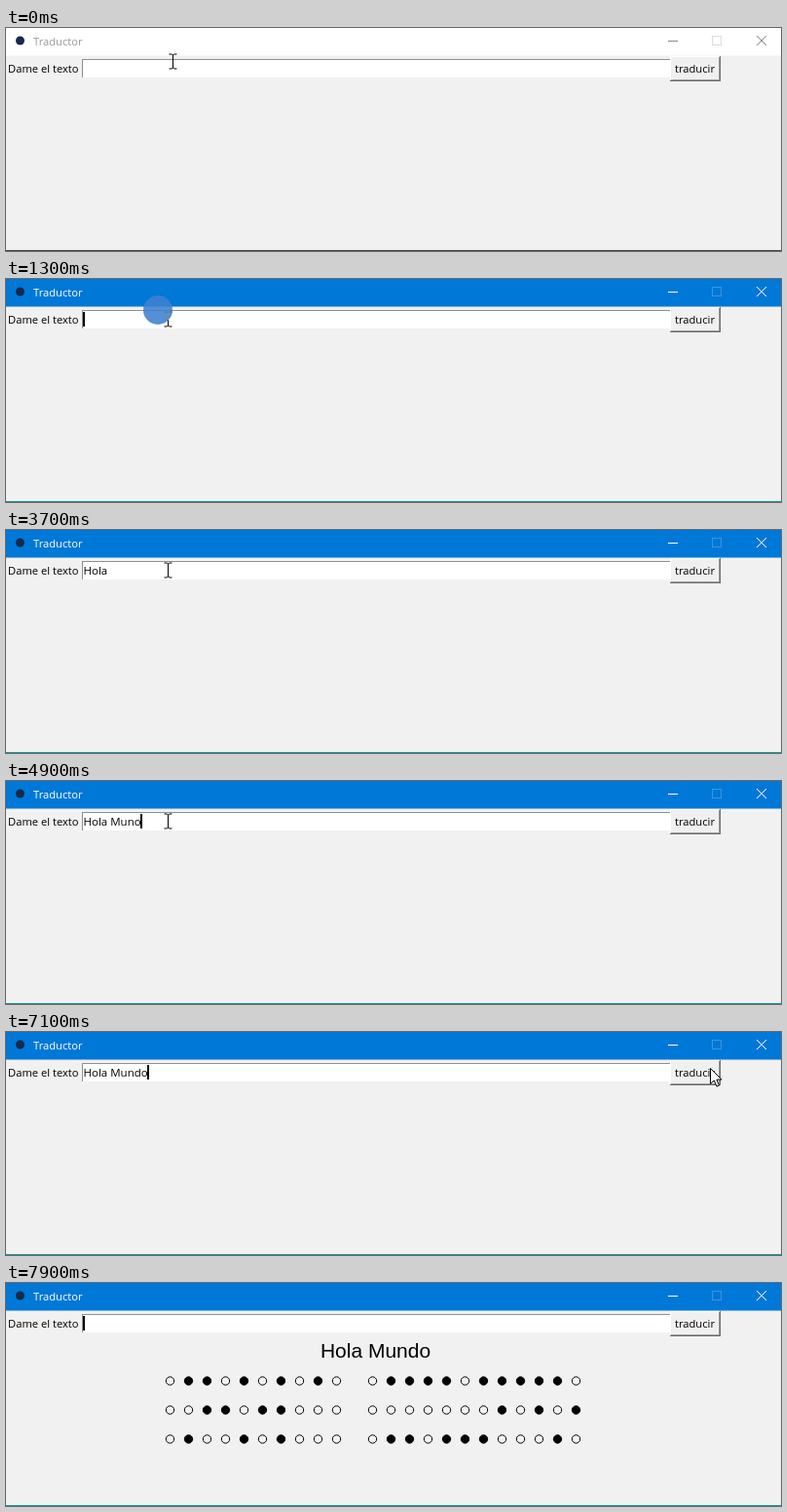
An HTML page for the animation above (8 s loop, 796 by 230 pixels).

```html
<!DOCTYPE html>
<html lang="es">
<head>
<meta charset="utf-8">
<title>Traductor</title>
<style>
  html, body { margin: 0; width: 796px; height: 230px; overflow: hidden; }
  svg { display: block; }
  text { font-family: "Open Sans", "Noto Sans", sans-serif; font-size: 11.2px; white-space: pre; }
  #typed { font-size: 11.5px; }
  #heading { font: 21px "Liberation Sans", Arial, sans-serif; }
</style>
</head>
<body>
<svg width="796" height="230" viewBox="0 0 796 230">
  <rect width="796" height="230" fill="#f1f1f2"/>
  <rect id="bar" width="796" height="28.5"/>
  <circle cx="14.5" cy="13" r="4.5" fill="#16294a"/>
  <text id="title" x="28" y="18">Traductor</text>
  <g fill="none" shape-rendering="crispEdges">
    <path id="minimise" d="M680 13.5h10"/>
    <rect id="maximise" x="725.5" y="8.5" width="9" height="9"/>
  </g>
  <path id="close" d="M771 8l10 10M781 8l-10 10" fill="none"/>

  <text x="2" y="46">Dame el texto</text>
  <g shape-rendering="crispEdges">
    <rect x="78" y="32" width="604" height="19" fill="#fff"/>
    <path d="M78.5 51V32.5H682" fill="none" stroke="#8f8f8f"/>
  </g>
  <text id="typed" x="79.5" y="46"></text>
  <rect id="caret" y="34" width="2" height="15" shape-rendering="crispEdges"/>

  <g fill="none" shape-rendering="crispEdges">
    <rect x="682" y="29" width="52" height="26" fill="#f0f0f0"/>
    <path id="lit" d="M682.5 54V29.5H733"/>
    <path id="innerShade" d="M683 53.5H732.5V30" stroke="#a0a0a0"/>
    <path id="shade" d="M682 54.5H733.5V29"/>
  </g>
  <text id="label" x="687" y="46">traducir</text>

  <g id="result">
    <text id="heading" x="379.5" y="77" text-anchor="middle">Hola Mundo</text>
    <g id="dots" stroke="#000"></g>
  </g>

  <rect id="edge" y="229" width="796" height="1"/>
  <path id="beam" d="M-4 -7.5h3l1 1 1-1h3M0 -6.5V6.5M-4 7.5h3l1-1 1 1h3" fill="none" stroke="#000"/>
  <path id="arrow" d="M0 0V16L3.8 12.5L6.5 18.7L9 17.6L6.4 11.6H11.5Z" fill="#fff" stroke="#000"/>
  <g id="click">
    <circle r="15" fill="#3e80d0" fill-opacity=".88"/>
    <path id="glint" d="M10.5 2V10" stroke="#a8825a"/>
  </g>
</svg>
<script>
const LOOP = 8000;
const el = id => document.getElementById(id);
const set = (id, attrs) => {
  for (const key in attrs) el(id).setAttribute(key, attrs[key]);
};
const show = (id, on) => set(id, { visibility: on ? "visible" : "hidden" });
const place = (id, point) => {
  show(id, point);
  if (point) set(id, { transform: `translate(${point[0]} ${point[1]})` });
};

// Each track lists [start in ms, value]; values hold until the next start.
const typing = [
  [0, ""], [2300, "H"], [2600, "Ho"], [2800, "Hol"], [3000, "Hola"],
  [3400, "Hola "], [4100, "Hola M"], [4400, "Hola Mu"], [4600, "Hola Mun"],
  [4900, "Hola Muno"], [5100, "Hola Mun"], [5500, "Hola Mundo"], [7600, ""]
];
const blink = [
  [0, false], [1300, true], [1800, false], [2100, true], [2700, false],
  [3000, true], [3700, false], [4000, true], [4500, false], [4800, true],
  [5500, false], [5700, true], [6400, false], [6700, true], [7300, false], [7500, true]
];
const beam = [
  [0, [171.5, 34.5]], [300, [177.5, 25]], [400, [158.5, 51]],
  [800, [158.5, 49]], [1000, [166.5, 41.5]], [6200, null]
];
const arrow = [
  [0, null], [6900, [738, 84]], [7000, [728, 48]], [7100, [723.5, 37.5]],
  [7700, [740.5, 37.5]], [7800, null]
];
const click = [
  [0, null], [1200, [156, 32]], [1400, null], [7200, [713, 28]], [7400, null]
];

const at = (track, t) => {
  let value;
  for (const [start, v] of track) if (t >= start) value = v;
  return value;
};
const within = (t, from, to) => t >= from && t < to;

// Braille cells: dots 1-3 run down the left column, 4-6 down the right.
const braille = [["46", "125", "135", "123", "1"], ["46", "134", "136", "1345", "145", "135"]];
function drawWord(cells, left) {
  cells.forEach((cell, i) => {
    for (let dot = 0; dot < 6; dot++) {
      const c = document.createElementNS("http://www.w3.org/2000/svg", "circle");
      c.setAttribute("cx", left + 38 * i + 19 * Math.floor(dot / 3));
      c.setAttribute("cy", 101 + 30 * (dot % 3));
      c.setAttribute("r", 4.2);
      c.setAttribute("fill", cell.includes(dot + 1) ? "#000" : "none");
      el("dots").append(c);
    }
  });
}
drawWord(braille[0], 168.5);
drawWord(braille[1], 376.5);

let typed = null;
function render(t) {
  const active = t >= 1300;
  set("bar", { fill: active ? "#0078d7" : "#fff" });
  set("title", { fill: active ? "#fff" : "#999" });
  set("minimise", { stroke: active ? "#fff" : "#888" });
  set("close", { stroke: active ? "#fff" : "#888" });
  set("maximise", { stroke: active ? "#3a96df" : "#ddd" });
  set("edge", { fill: active ? "#169a96" : "#444" });

  const text = at(typing, t);
  if (text !== typed) {
    el("typed").textContent = typed = text;
    const width = text ? el("typed").getComputedTextLength() : 0;
    set("caret", { x: Math.round(79.2 + width) });
  }
  show("caret", at(blink, t));

  const pressed = within(t, 7200, 7400);
  set("lit", { stroke: pressed ? "#696969" : "#fff" });
  set("shade", { stroke: pressed ? "#fff" : "#696969" });
  show("innerShade", !pressed);
  set("label", { x: pressed ? 688 : 687, y: pressed ? 47 : 46 });

  show("result", t >= 7400);
  place("beam", at(beam, t));
  place("arrow", at(arrow, t));
  place("click", at(click, t));
  show("glint", within(t, 1200, 1400));
}

const start = performance.now();
function tick() {
  render((performance.now() - start) % LOOP);
  requestAnimationFrame(tick);
}
tick();
</script>
</body>
</html>
```
